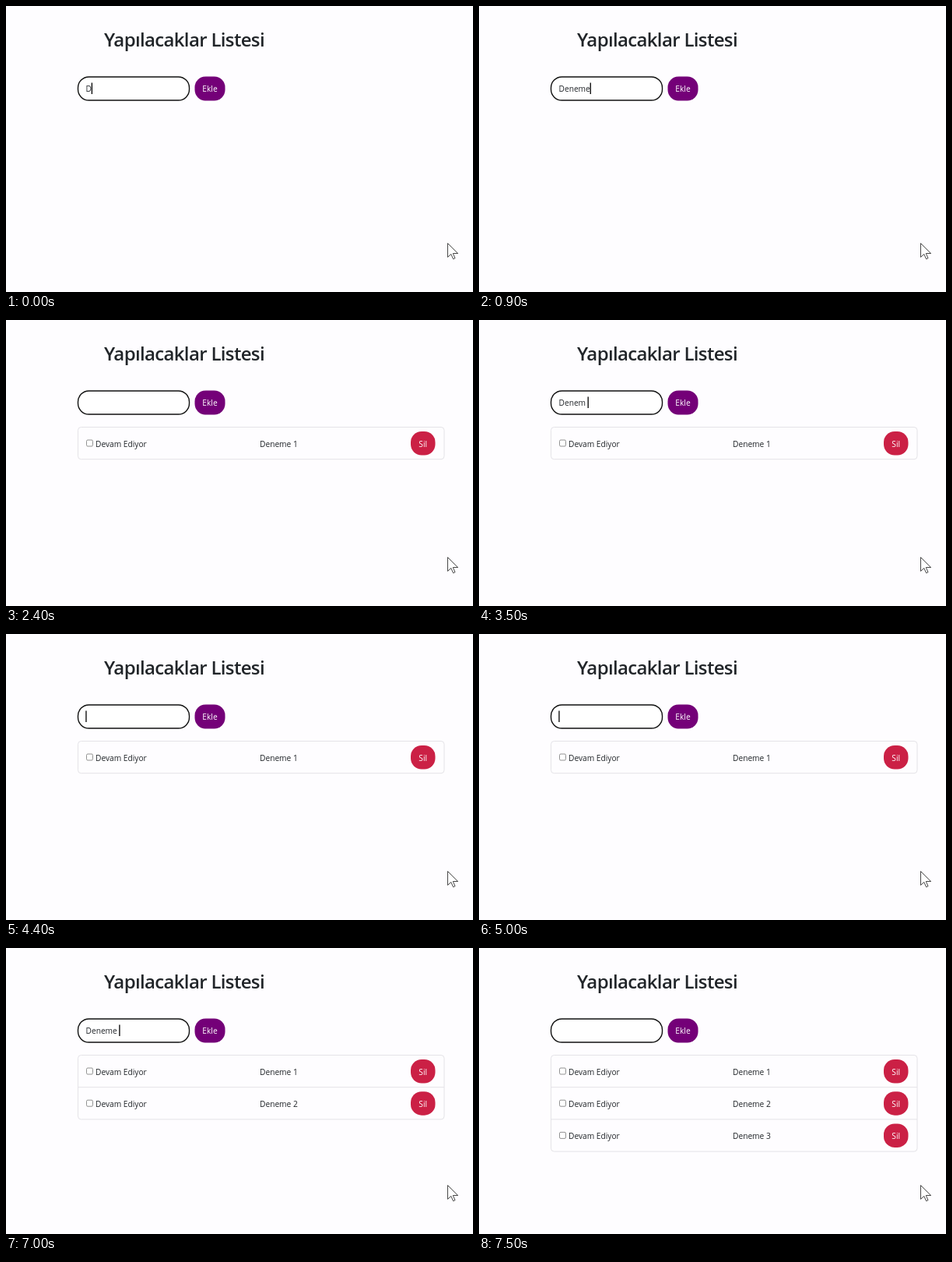
These frames come from a looping animation (600x367 px, 8000 ms). An HTML page:

```html
<!DOCTYPE html>
<html lang="tr">
<head>
<meta charset="utf-8">
<style>
  html, body { margin: 0; height: 100%; overflow: hidden; background: #fefdff; }
  svg { display: block; }
  text { font: 10.2px "Open Sans", "Noto Sans", sans-serif; fill: #212529; white-space: pre; }
  .title { font-size: 24px; font-weight: 600; letter-spacing: -.65px; }
  .label { fill: #fff; text-anchor: middle; }
  .line { fill: none; stroke: #e4e3e7; }
</style>
</head>
<body>
<svg width="600" height="367" viewBox="0 0 600 367">
  <text class="title" x="126" y="52">Yapılacaklar Listesi</text>

  <rect x="92.5" y="91" width="143" height="30" rx="14" fill="#fff" stroke="#111" stroke-width="1.4"/>
  <text id="entry" x="102.5" y="110.3"></text>
  <rect id="caret" y="98.5" width="1.3" height="14.5" fill="#000"/>

  <rect x="242.5" y="90.5" width="39" height="31" rx="14" fill="#740078"/>
  <text class="label" x="262" y="110.3">Ekle</text>

  <g id="rows"></g>
  <rect id="frame" class="line" x="92.5" y="137.5" width="470.5" rx="4"/>

  <path d="M567.5 304.5V322.3L571.8 318.4L574.6 324.7L577 323.6L574.3 317.5H580.6Z"
        fill="#fff" stroke="#333" stroke-width=".9"/>
</svg>
<script>
const LOOP = 8000, ROW = 41.2;
const [entry, caret, rows, frame] = ["entry", "caret", "rows", "frame"].map(id => document.getElementById(id));

// [start in ms, text in the field]
const typing = [
  [0, "D"], [100, "De"], [200, "Den"], [300, "Dene"], [400, "Denem"], [500, "Deneme"],
  [1000, "Deneme "], [1100, "Deneme 1"], [1400, ""],
  [3000, "D"], [3100, "De"], [3200, "Den"], [3300, "Dene"], [3400, "Denem"], [3500, "Denem "],
  [4000, "Deneme "], [4100, "Deneme 2"], [4400, ""],
  [6000, "D"], [6100, "De"], [6200, "Den"], [6300, "Dene"], [6400, "Denem"],
  [7000, "Deneme "], [7100, "Deneme 3"], [7300, ""]
];
const caretHidden = [[1600, 2000], [2400, 3000], [4600, 5000], [5400, 6000], [7500, LOOP]];
const rowAdded = [1400, 5100, 7400];

rows.innerHTML = rowAdded.map((_, i) => `
  <g transform="translate(0 ${i * ROW})">
    ${i ? '<path class="line" d="M92.5 137.5H563"/>' : ""}
    <rect x="103.5" y="154" width="8" height="8" rx="1.5" fill="#fff" stroke="#767676" stroke-width=".8"/>
    <text x="115" y="163">Devam Ediyor</text>
    <text x="326" y="163">Deneme ${i + 1}</text>
    <rect x="520" y="143" width="31.5" height="30.5" rx="14" fill="#cb2045"/>
    <text class="label" x="535.7" y="163">Sil</text>
  </g>`).join("");

function draw(now) {
  const t = now % LOOP;
  entry.textContent = typing.findLast(([start]) => t >= start)[1];
  caret.setAttribute("x", 102.3 + entry.getComputedTextLength());
  caret.style.display = caretHidden.some(([from, to]) => t >= from && t < to) ? "none" : "";

  const count = rowAdded.filter(start => t >= start).length;
  [...rows.children].forEach((row, i) => row.style.display = i < count ? "" : "none");
  frame.style.display = count ? "" : "none";
  frame.setAttribute("height", count * ROW);
}

function tick() {
  draw(performance.now());
  requestAnimationFrame(tick);
}
tick();
</script>
</body>
</html>
```
